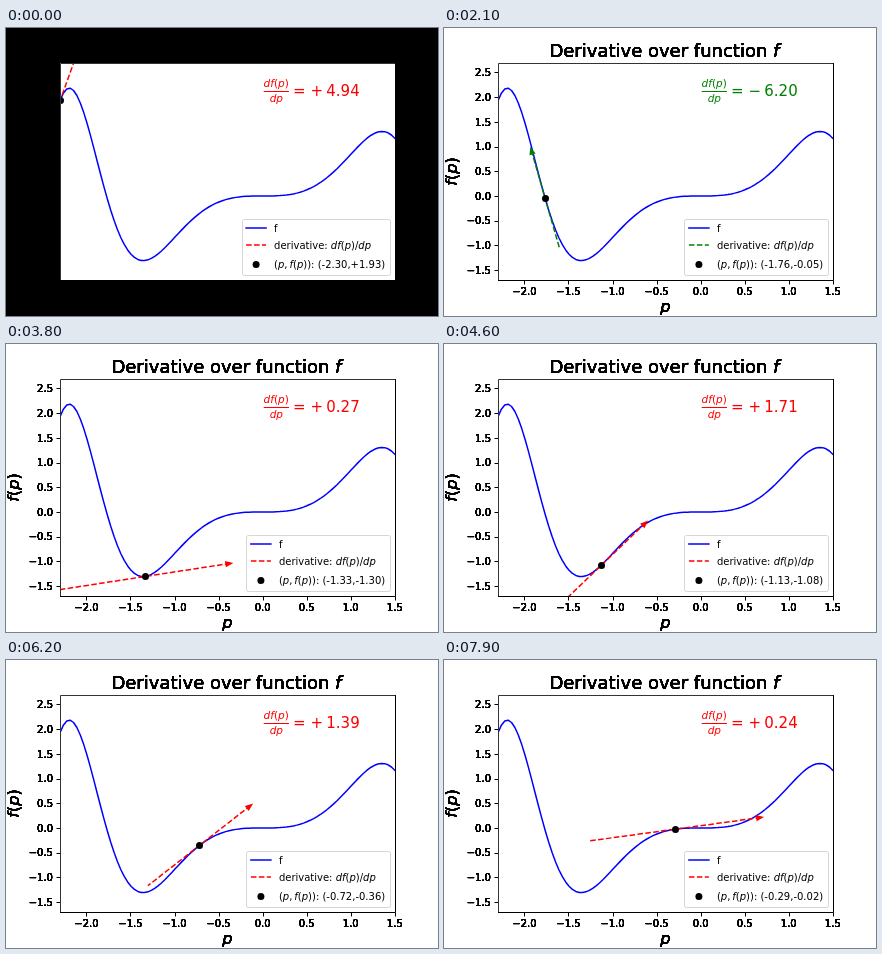
An HTML page that plays this animation: 432 by 288 pixels, repeating every 8 s.

```html
<!DOCTYPE html>
<html lang="en">
<head>
<meta charset="utf-8">
<title>Derivative over function f</title>
<style>
  html, body { margin: 0; width: 100%; height: 100%; overflow: hidden; background: #fff; }
  svg { display: block; width: 432px; height: 288px; }
  text { font: 10px "DejaVu Sans", Verdana, sans-serif; white-space: pre; }
  .i { font-style: italic; }
  .mid { text-anchor: middle; }
  .end { text-anchor: end; }
  .title { font-size: 18px; }
  .axis { font-size: 16px; }
  .value { font-size: 15px; }
  .frac { font-size: 10.5px; }
  .line { fill: none; stroke-width: 1.5; stroke-linejoin: round; stroke-linecap: square; }
  .dash { stroke-dasharray: 5.55 2.4; stroke-linecap: butt; }
  .spine { fill: none; stroke: #000; }
  .soft { stroke: #333; }
</style>
</head>
<body>
<svg viewBox="0 0 432 288">
  <defs>
    <clipPath id="clip"><rect x="54" y="35" width="335" height="217"/></clipPath>
    <filter id="build" filterUnits="userSpaceOnUse" x="0" y="0" width="432" height="288">
      <feComponentTransfer><feFuncA id="alpha" type="table" tableValues="0 1"/></feComponentTransfer>
    </filter>
  </defs>
  <rect id="back" width="432" height="288"/>
  <rect x="54" y="35" width="335" height="217" fill="#fff"/>

  <g clip-path="url(#clip)">
    <path id="curve" class="line" stroke="#00f"/>
    <path id="tangent" class="line dash"/>
    <path id="head" d="M3 0L-5 3.2V-3.2Z"/>
    <circle id="dot" r="3.5"/>
  </g>

  <path id="ticks" stroke="#000"/>
  <path class="spine soft" d="M54.5 252V35.5H389"/>
  <path class="spine" d="M54 252.5H389.5V35"/>

  <g id="outer" filter="url(#build)">
    <text class="title mid" x="220.4" y="28.6">Derivative over function <tspan class="i">f</tspan></text>
    <text class="axis mid i" x="221.4" y="283.5">p</text>
    <text class="axis mid" transform="translate(13 143.5) rotate(-90)"><tspan class="i">f</tspan>(<tspan class="i">p</tspan>)</text>
  </g>

  <g id="slope">
    <text class="frac" x="257.5" y="59"><tspan class="i">df</tspan>(<tspan class="i">p</tspan>)</text>
    <path d="M257.7 63.5h25.3" stroke="currentColor"/>
    <text class="frac i mid" x="270.3" y="74.2">dp</text>
    <text class="value" x="287" y="68">=</text>
    <text class="value" x="304.6" y="68" id="sign"></text>
    <text class="value" x="320.3" y="68" id="size"></text>
  </g>

  <rect id="box" y="191.5" height="56" rx="2" fill="#fff" fill-opacity=".8" stroke="#ccc" stroke-opacity=".8"/>
  <g id="legend">
    <path class="line" d="M4 200h20" stroke="#00f"/>
    <text x="32" y="203.5">f</text>
    <path id="sample" class="line dash" d="M4 217h20"/>
    <text x="32" y="220.5">derivative: <tspan class="i">df</tspan>(<tspan class="i">p</tspan>)/<tspan class="i">dp</tspan></text>
    <circle cx="14" cy="236.5" r="3.5"/>
    <text x="32" y="239.5">(<tspan class="i">p</tspan>,<tspan class="i" dx="1.95">f</tspan>(<tspan class="i">p</tspan>)): <tspan id="coords"></tspan></text>
  </g>
</svg>
<script>
  const $ = id => document.getElementById(id);
  const FRAMES = 80, STEP = 100;

  const f = x => x * Math.sin(x * x);
  const df = x => Math.sin(x * x) + 2 * x * x * Math.cos(x * x);
  const spread = (i, count) => -2.3 + 3.8 * i / (count - 1);

  const sx = x => 54 + (x + 2.3) * 334.8 / 3.8;
  const sy = y => 252 - (y + 1.7) * 217.44 / 4.4;
  const point = (x, y) => sx(x).toFixed(2) + " " + sy(y).toFixed(2);
  const path = points => "M" + points.map(q => point(...q)).join("L");
  const signed = v => (v < 0 ? "-" : "+") + Math.abs(v).toFixed(2);
  const snap = v => Math.floor(v) + 0.5;

  function set(id, attrs) {
    for (const name in attrs) $(id).setAttribute(name, attrs[name]);
  }

  function addLabel(v, cls, x, y) {
    const t = document.createElementNS("http://www.w3.org/2000/svg", "text");
    t.setAttribute("class", cls);
    t.setAttribute("x", x);
    t.setAttribute("y", y);
    t.textContent = v.toFixed(1).replace("-", "\u2212");
    $("outer").append(t);
  }

  function drawAxes() {
    let d = "";
    for (let v = -2; v <= 1.5; v += 0.5) {
      d += `M${Math.round(sx(v)) + 0.5} 252.5v4`;
      addLabel(v, "mid", sx(v), 266.8);
    }
    for (let v = -1.5; v <= 2.5; v += 0.5) {
      d += `M54.5 ${Math.round(sy(v)) + 0.5}h-4`;
      addLabel(v, "end", 47, sy(v) + 3.8);
    }
    set("ticks", { d });
    const xs = Array.from({ length: 100 }, (_, i) => spread(i, 100));
    set("curve", { d: path(xs.map(x => [x, f(x)])) });
  }

  function draw(n) {
    const p = spread(n, 150), y = f(p), m = df(p);
    const color = m < 0 ? "#008000" : "#ff0000";

    // Unit vector along the tangent; dashes run right to left, the head sits uphill.
    const ux = 1 / Math.hypot(1, m), uy = m * ux;
    const right = [p + ux, y + uy], left = [p - ux, y - uy];
    const [from, tip] = m < 0 ? [right, left] : [left, right];
    const angle = Math.atan2(sy(tip[1]) - sy(from[1]), sx(tip[0]) - sx(from[0])) * 180 / Math.PI;

    set("tangent", { d: path([right, left]), stroke: color });
    set("head", { fill: color, transform: `translate(${point(...tip)}) rotate(${angle})` });
    set("dot", { cx: snap(sx(p)), cy: snap(sy(y)) });

    set("slope", { fill: color, color });
    $("sign").textContent = m < 0 ? "\u2212" : "+";
    $("size").textContent = Math.abs(m).toFixed(2);

    // The box hugs its widest row, which is narrower with a minus sign.
    const boxX = y < 0 ? 240.9 : 236.1;
    set("box", { x: snap(boxX), width: 384.5 - snap(boxX) });
    set("legend", { transform: `translate(${boxX} 0)` });
    set("sample", { stroke: color });
    $("coords").textContent = `(${signed(p)},${signed(y)})`;

    // Dark opening; then the outer lettering is laid over itself and its soft edges fill in.
    set("back", { fill: n ? "#fff" : "#000" });
    const layers = Math.min(n, 9) + 1;
    const ramp = Array.from({ length: 21 }, (_, i) => 1 - (1 - i / 20) ** layers);
    set("alpha", { tableValues: ramp.join(" ") });
  }

  let start, shown = -1;
  function tick(now) {
    start ??= now;
    const n = Math.floor(Math.max(0, now - start) / STEP) % FRAMES;
    if (n !== shown) draw(shown = n);
    requestAnimationFrame(tick);
  }

  drawAxes();
  draw(0);
  requestAnimationFrame(tick);
</script>
</body>
</html>
```
